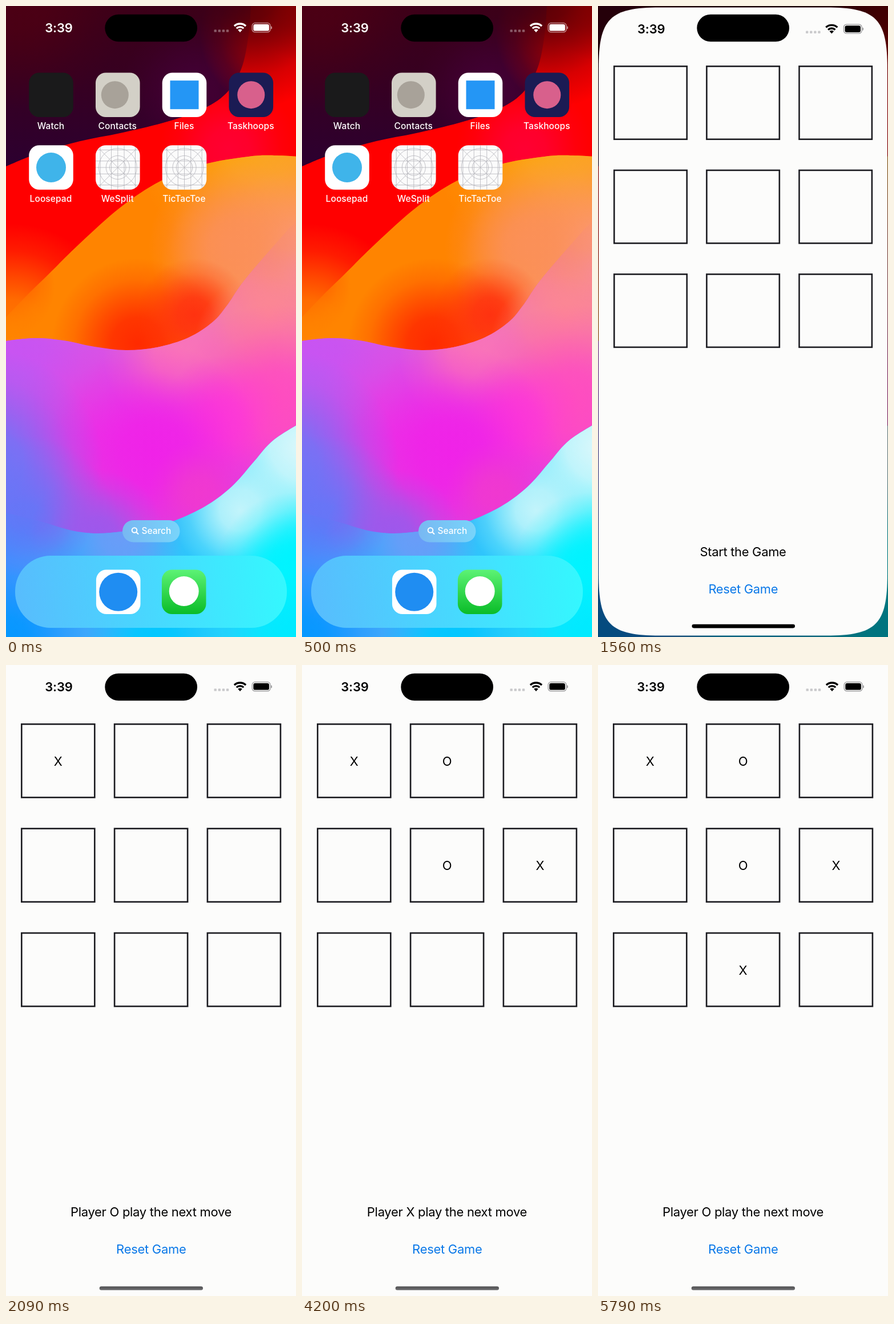
These frames come from a looping animation (508x1102 px, 8000 ms). An HTML page with a canvas:

```html
<!DOCTYPE html>
<html lang="en">
<head>
<meta charset="utf-8">
<title>Tic-tac-toe on a phone</title>
<style>
html, body { margin: 0; width: 100%; height: 100%; overflow: hidden; background: #000; }
canvas { display: block; width: 100vw; height: 100vh; }
</style>
</head>
<body>
<canvas id="stage" width="508" height="1102"></canvas>
<script>
const W = 508, H = 1102, LOOP = 8000;
const FONT = 'Inter, "Liberation Sans", sans-serif';
const ctx = document.getElementById('stage').getContext('2d');

// Time, player and cell of every move
const MOVES = [[2090, 'X', 0], [2610, 'O', 4], [3140, 'X', 5], [4200, 'O', 1], [5790, 'X', 7]];
const LIFT = 1030, OPEN = 1560;

function newLayer() {
  const c = document.createElement('canvas');
  c.width = W;
  c.height = H;
  return c.getContext('2d');
}

function rounded(g, x, y, w, h, r, fill) {
  g.beginPath();
  g.roundRect(x, y, w, h, r);
  g.fillStyle = fill;
  g.fill();
}

function disc(g, x, y, r, fill) {
  g.beginPath();
  g.arc(x, y, r, 0, Math.PI * 2);
  g.fillStyle = fill;
  g.fill();
}

function linear(g, x0, y0, x1, y1, ...colors) {
  const grad = g.createLinearGradient(x0, y0, x1, y1);
  colors.forEach((c, i) => grad.addColorStop(i / (colors.length - 1), c));
  return grad;
}

function label(g, str, x, y, size, weight, color, align = 'center', spacing = 0) {
  g.font = `${weight} ${size}px ${FONT}`;
  g.letterSpacing = spacing + 'px';
  g.textAlign = align;
  g.fillStyle = color;
  g.fillText(str, x, y);
}

// ---- wallpaper ----
function glow(g, x, y, r, color) {
  const grad = g.createRadialGradient(x, y, 0, x, y, r);
  [[0, 'ff'], [.3, 'dc'], [.5, '96'], [.75, '38'], [1, '00']].forEach(([p, a]) => grad.addColorStop(p, color + a));
  g.fillStyle = grad;
  g.fillRect(x - r, y - r, 2 * r, 2 * r);
}

// Smooth edge through the points, closed along the top or bottom of the stage
function edgePath(g, pts, closeY) {
  g.beginPath();
  g.moveTo(...pts[0]);
  for (let i = 0; i < pts.length - 1; i++) {
    const a = pts[i - 1] || pts[i], b = pts[i], c = pts[i + 1], d = pts[i + 2] || c;
    g.bezierCurveTo(b[0] + (c[0] - a[0]) / 6, b[1] + (c[1] - a[1]) / 6,
      c[0] - (d[0] - b[0]) / 6, c[1] - (d[1] - b[1]) / 6, c[0], c[1]);
  }
  g.lineTo(pts[pts.length - 1][0], closeY);
  g.lineTo(pts[0][0], closeY);
  g.closePath();
}

function band(out, pts, closeY, base, glows, fades) {
  const g = newLayer();
  edgePath(g, pts, closeY);
  g.save();
  g.clip();
  g.fillStyle = base(g);
  g.fillRect(0, 0, W, H);
  glows.forEach(a => glow(g, ...a));
  g.restore();
  g.globalCompositeOperation = 'destination-out';
  fades.forEach(a => glow(g, ...a, '#000000'));
  out.drawImage(g.canvas, 0, 0);
}

function paintWallpaper() {
  const g = newLayer();
  g.fillStyle = '#ff0000';
  g.fillRect(0, 0, W, H);
  glow(g, 420, -40, 220, '#4a0008');
  glow(g, 540, -30, 130, '#800000');
  glow(g, 390, 250, 120, '#ff0032');
  glow(g, 10, 570, 190, '#ff7c00');

  band(g, [[-20, 290], [0, 280], [60, 256], [130, 236], [200, 222], [275, 204], [340, 182], [385, 153], [412, 110], [425, 50], [430, -20]], -20,
    c => linear(c, 0, 0, 0, 280, '#3c0018', '#360022', '#2c0030'),
    [[20, -20, 200, '#4c0014'], [330, 150, 130, '#420034']],
    [[470, 50, 130]]);

  band(g, [[-20, 565], [30, 512], [75, 468], [130, 414], [200, 352], [270, 306], [345, 277], [425, 263], [470, 261], [530, 264]], H,
    () => '#ff8400',
    [[450, 240, 220, '#fba814'], [520, 470, 250, '#fb9a86'], [400, 420, 150, '#fb9058'],
     [230, 590, 150, '#ff2a00'], [330, 540, 100, '#ff3210'], [450, 590, 120, '#fc8a90']],
    [[-10, 490, 95]]);

  band(g, [[-20, 589], [0, 585], [50, 580], [100, 584], [155, 595], [210, 601], [265, 596], [320, 579], [362, 552], [388, 522], [425, 470], [530, 350]], H,
    c => linear(c, 0, 580, 0, 920, '#d656e6', '#e838e4', '#d848d8'),
    [[460, 540, 240, '#fc8696'], [300, 610, 130, '#fa74b8'], [470, 690, 170, '#ff4cc0'], [380, 720, 110, '#ff3cd4'],
     [260, 780, 190, '#f022e8'], [20, 600, 150, '#c854f2'], [-30, 800, 200, '#7076f6'],
     [30, 920, 170, '#6078f8'], [160, 930, 120, '#9c58ec'], [340, 850, 90, '#f038d0']],
    [[510, 370, 190]]);

  band(g, [[-20, 880], [60, 900], [115, 916], [160, 921], [210, 917], [260, 909], [310, 893], [360, 867], [400, 835], [435, 795], [470, 757], [530, 720]], H,
    c => linear(c, 0, 0, W, 0, '#3c92ff', '#3cb8fa', '#08ecff'),
    [[520, 770, 190, '#dcf7fb'], [410, 880, 120, '#c2f4fb'], [200, 925, 110, '#6a9cf8'], [500, 980, 130, '#00f4ff'],
     [0, 1110, 140, '#0498ff'], [260, 1110, 120, '#00c8ff'], [510, 1110, 120, '#00eaff']],
    [[40, 885, 115]]);
  return g.canvas;
}

// ---- home screen ----
const COLS = [79, 195.8, 312.5, 429.3], ROWS = [155.2, 282], TILE = 77.6;

function tile(g, x, y, fill, size = TILE) {
  rounded(g, x - size / 2, y - size / 2, size, size, size * .23, fill);
}

function square(g, x, y, s, fill) {
  g.fillStyle = fill;
  g.fillRect(x - s / 2, y - s / 2, s, s);
}

// Empty app icon: circles and construction lines
function gridTile(g, x, y, size = TILE) {
  const h = size / 2;
  g.save();
  tile(g, x, y, '#fbfbfb', size);
  g.clip();
  g.translate(x, y);
  g.strokeStyle = '#b4b4ba';
  g.lineWidth = .8;
  g.beginPath();
  for (const k of [-.79, -.29, 0, .29, .79]) {
    g.moveTo(k * h, -h); g.lineTo(k * h, h);
    g.moveTo(-h, k * h); g.lineTo(h, k * h);
  }
  g.moveTo(-h, -h); g.lineTo(h, h);
  g.moveTo(h, -h); g.lineTo(-h, h);
  for (const k of [.37, .53, .86]) {
    g.moveTo(k * h, 0);
    g.arc(0, 0, k * h, 0, Math.PI * 2);
  }
  g.stroke();
  g.restore();
}

function paintHome(wallpaper) {
  const g = newLayer(), [a, b, c, d] = COLS, [r1, r2] = ROWS;
  g.drawImage(wallpaper, 0, 0);

  tile(g, a, r1, '#1a1a1b');
  tile(g, b, r1, '#d3d0c7');
  disc(g, b - 5, r1, 24, '#a8a299');
  tile(g, c, r1, '#ffffff');
  square(g, c, r1, 50, '#2496f5');
  tile(g, d, r1, '#1b1b54');
  disc(g, d, r1, 24, '#d8608c');
  tile(g, a, r2, '#ffffff');
  disc(g, a, r2, 26, '#3fb4ea');
  gridTile(g, b, r2);

  const names = ['Watch', 'Contacts', 'Files', 'Taskhoops', 'Loosepad', 'WeSplit', 'TicTacToe'];
  names.forEach((n, i) => label(g, n, COLS[i % 4] - .5, i < 4 ? 215 : 342, 15.5, 500, '#fff', 'center', .1));

  rounded(g, 204, 898, 100.5, 38.5, 19.2, linear(g, 204, 0, 304, 0, '#78b8f2', '#78d4fa'));
  g.strokeStyle = '#fff';
  g.lineWidth = 2;
  g.lineCap = 'round';
  g.beginPath();
  g.arc(225, 915.5, 4.3, 0, Math.PI * 2);
  g.moveTo(228.4, 919);
  g.lineTo(231.5, 922);
  g.stroke();
  label(g, 'Search', 237.5, 922.3, 15.5, 500, '#fff', 'left', -.05);

  rounded(g, 16, 960, 476, 126, 62, linear(g, 16, 1050, 492, 1000, '#58bcfd', '#48d8fe', '#34f8fe'));
  tile(g, 196.7, 1023.3, '#ffffff');
  disc(g, 196.7, 1023.3, 33.5, '#1f8df2');
  tile(g, 311.7, 1023.3, linear(g, 0, 985, 0, 1062, '#5cf274', '#0abc28'));
  disc(g, 311.7, 1022, 26, '#ffffff');
  return g.canvas;
}

// ---- shared chrome ----
function island(g) {
  rounded(g, 173.3, 14.7, 161.7, 47.5, 23.7, '#000');
}

function statusBar(g, color, dots, rim) {
  label(g, '3:39', 92.5, 46, 22, 600, color, 'center', -.1);
  for (let i = 0; i < 4; i++) rounded(g, 364.5 + i * 7.1, 41.2, 4.4, 4.4, 1.2, dots);

  const cx = 410, cy = 46, a0 = -Math.PI * .735, a1 = -Math.PI * .265;
  g.strokeStyle = g.fillStyle = color;
  g.lineCap = 'butt';
  g.lineWidth = 3.3;
  for (const r of [15, 9.3]) {
    g.beginPath();
    g.arc(cx, cy, r, a0, a1);
    g.stroke();
  }
  g.beginPath();
  g.moveTo(cx, cy);
  g.arc(cx, cy, 5.6, a0, a1);
  g.fill();

  g.strokeStyle = rim;
  g.lineWidth = 1.3;
  g.beginPath();
  g.roundRect(431.2, 29.7, 31.8, 16, 5);
  g.stroke();
  rounded(g, 433.3, 31.8, 27.6, 11.8, 3.2, color);
  rounded(g, 464.2, 35.2, 1.8, 5.4, [0, 1.8, 1.8, 0], rim);
}

// ---- game screen ----
const BOX = 130.6;

function game(g, t) {
  statusBar(g, '#000', '#c9c9cb', '#98989a');
  g.strokeStyle = '#1b1b20';
  g.lineWidth = 2.6;
  for (let i = 0; i < 9; i++) {
    const x = 26 + i % 3 * 162.8, y = 102 + Math.floor(i / 3) * 182.4;
    g.strokeRect(x + 1.3, y + 1.3, BOX - 2.6, BOX - 2.6);
  }
  const done = MOVES.filter(m => t >= m[0]);
  for (const [, who, i] of done) {
    label(g, who, 91.3 + i % 3 * 162.8, 176 + Math.floor(i / 3) * 182.4, 22, 400, '#000');
  }
  const next = done.length % 2 ? 'O' : 'X';
  const text = done.length ? `Player ${next} play the next move` : 'Start the Game';
  label(g, text, 254, 962.5, 22, 400, '#000', 'center', -.3);
  label(g, 'Reset Game', 254.3, 1028.3, 22, 400, '#0a78e8', 'center', -.3);
}

// Rounded screen outline with continuous corners
function screenPath(g) {
  const e = 108, k = e * .18;
  g.beginPath();
  g.moveTo(0, e);
  g.bezierCurveTo(0, k, k, 0, e, 0);
  g.lineTo(W - e, 0);
  g.bezierCurveTo(W - k, 0, W, k, W, e);
  g.lineTo(W, H - e);
  g.bezierCurveTo(W, H - k, W - k, H, W - e, H);
  g.lineTo(e, H);
  g.bezierCurveTo(k, H, 0, H - k, 0, H - e);
  g.closePath();
}

const wallpaper = paintWallpaper();
const home = paintHome(wallpaper);
const PAPER = '#fcfcfb';

function drawHome(t) {
  ctx.drawImage(home, 0, 0);
  if (t < LIFT) {
    gridTile(ctx, COLS[2], ROWS[1]);
  } else {
    ctx.save();
    ctx.shadowColor = 'rgba(0,0,0,.25)';
    ctx.shadowBlur = 5;
    tile(ctx, 310.8, 288.8, '#a2a2a8', 89);
    ctx.restore();
    ctx.save();
    tile(ctx, 310.8, 288.8, '#a2a2a8', 89);
    ctx.clip();
    gridTile(ctx, 310.8, 287.6, 88.6);
    ctx.restore();
  }
  statusBar(ctx, '#fff', 'rgba(255,255,255,.35)', 'rgba(255,255,255,.6)');
}

function drawOpening(t) {
  const s = .9955;
  ctx.drawImage(wallpaper, 0, 0);
  ctx.fillStyle = 'rgba(0,0,0,.5)';
  ctx.fillRect(0, 0, W, H);
  ctx.save();
  ctx.translate(W / 2, H / 2);
  ctx.scale(s, s);
  ctx.translate(-W / 2, -H / 2);
  screenPath(ctx);
  ctx.fillStyle = PAPER;
  ctx.fill();
  game(ctx, t);
  ctx.restore();
  rounded(ctx, 164.5, 1079.8, 180.5, 6.6, 3.3, '#000');
}

function drawGame(t) {
  ctx.fillStyle = PAPER;
  ctx.fillRect(0, 0, W, H);
  game(ctx, t);
  rounded(ctx, 163.7, 1085.2, 181.3, 6.6, 3.3, linear(ctx, 0, 1085, 0, 1092, '#4e4e50', '#707072'));
}

function frame() {
  const t = performance.now() % LOOP;
  if (t < OPEN) drawHome(t);
  else if (t < MOVES[0][0]) drawOpening(t);
  else drawGame(t);
  island(ctx);
  requestAnimationFrame(frame);
}
frame();
</script>
</body>
</html>
```
